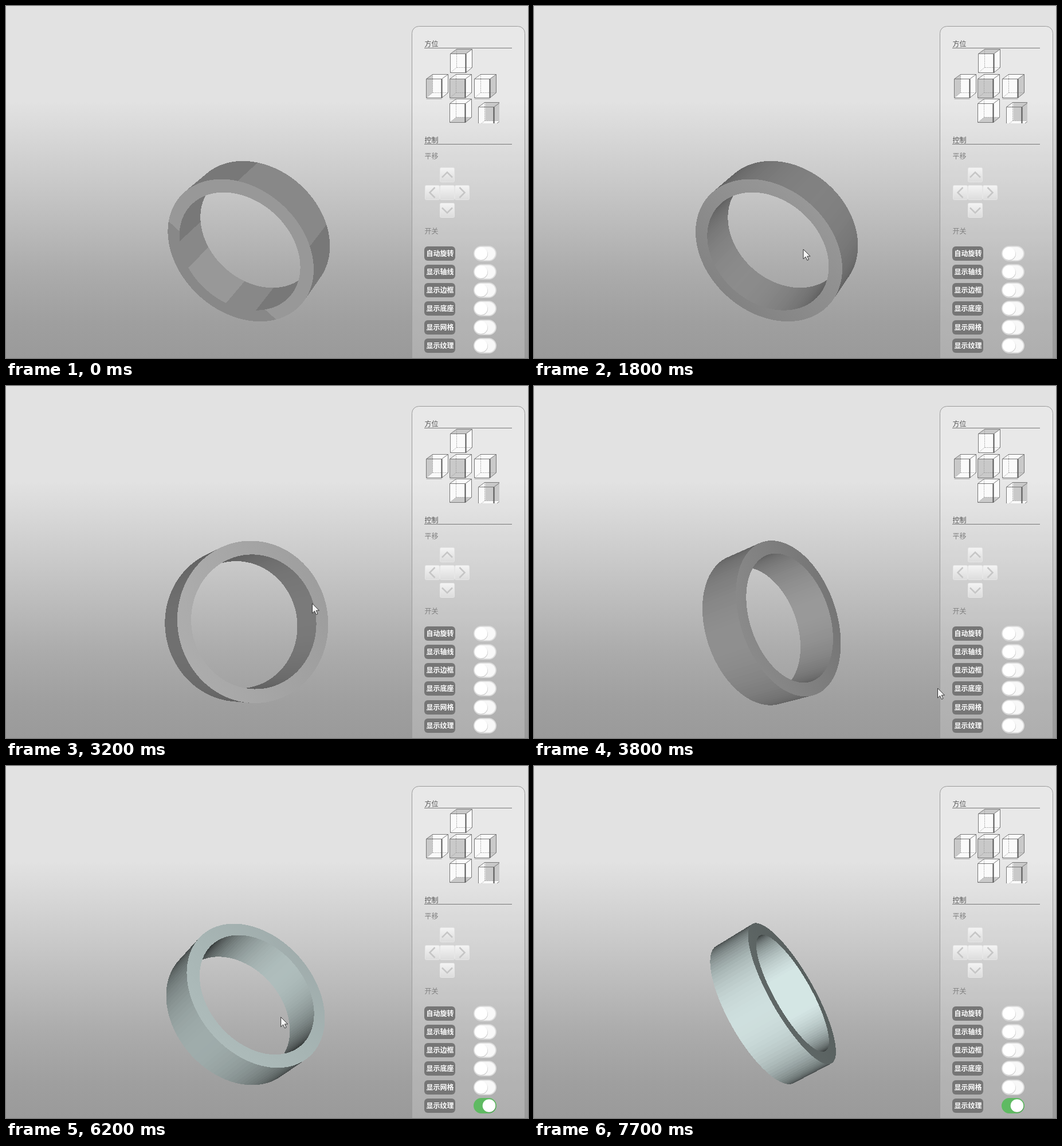
An HTML page for the animation above (8000 ms loop, 911x615 px).

```html
<!DOCTYPE html>
<html lang="zh-CN">
<head>
<meta charset="utf-8">
<title>Ring viewer</title>
<style>
  html, body { margin: 0; width: 100%; height: 100%; overflow: hidden; background: #e2e2e2; }
  svg { display: block; width: 911px; height: 615px; }
  text { font: 12px "Noto Sans CJK SC", "Noto Sans CJK", "Noto Sans", sans-serif; }
  .label { font-weight: 700; }
</style>
</head>
<body>
<svg id="stage" viewBox="0 0 911 615" xmlns="http://www.w3.org/2000/svg">
  <defs>
    <linearGradient id="sky" x1="0" y1="0" x2="0" y2="1">
      <stop offset="0" stop-color="#e2e2e2"/>
      <stop offset=".27" stop-color="#e2e2e2"/>
      <stop offset=".5" stop-color="#c9c9c9"/>
      <stop offset=".76" stop-color="#ababab"/>
      <stop offset=".9" stop-color="#9f9f9f"/>
      <stop offset="1" stop-color="#9a9a9a"/>
    </linearGradient>
    <linearGradient id="key" x1="0" y1="0" x2="0" y2="1">
      <stop offset="0" stop-color="#f4f4f4"/>
      <stop offset="1" stop-color="#dcdcdc"/>
    </linearGradient>
    <linearGradient id="faceShade" gradientUnits="userSpaceOnUse">
      <stop offset="0"/><stop/><stop/><stop offset="1"/>
    </linearGradient>
    <clipPath id="crop"><rect x="822" y="166" width="39" height="39"/></clipPath>
  </defs>
  <rect width="911" height="615" fill="url(#sky)"/>
  <g id="ring" shape-rendering="crispEdges"></g>
  <rect x="708.5" y="35.5" width="197" height="640" rx="12" fill="#fff" fill-opacity=".2" stroke="#9a9a9a"/>
  <g id="panel"></g>
  <path id="arrow" d="M0 0V17L4 13.2 6.8 19.3 9.5 18.1 6.8 12.2H12Z" fill="#f4f4f4" stroke="#333" stroke-linejoin="round"/>
  <path id="hand" d="M-1.5 1C-1.5-1 1.5-1 1.5 1V7C2 6 4.4 6.2 4.5 8 5.2 7 7.2 7.4 7.3 9 8.2 8.2 9.8 8.8 9.8 10.4V14C9.8 16 8.3 17 8.2 20H-.6C-1 17-4 15-6 11-6 9.6-5 8.4-3 9.6L-1.5 11.5Z" fill="#fff" stroke="#222" stroke-linejoin="round"/>
</svg>
<script>
const NS = "http://www.w3.org/2000/svg";
const byId = id => document.getElementById(id);

function add(parent, tag, attrs, label) {
  const el = document.createElementNS(NS, tag);
  set(el, attrs);
  if (label) el.textContent = label;
  parent.appendChild(el);
  return el;
}
function set(el, attrs) {
  for (const k in attrs) el.setAttribute(k, attrs[k]);
}

// ---- side panel ----
const panel = byId("panel");

function heading(label, y, color, ruled) {
  add(panel, "text", { x: 730.5, y, fill: color }, label);
  if (ruled) add(panel, "path", { d: `M730 ${y + 2.5}H883`, stroke: "#777" });
}
heading("方位", 71, "#555", true);
heading("控制", 239, "#555", true);
heading("平移", 267, "#808080");
heading("开关", 398, "#808080");

// Wire cube with one side tinted; (x, y) is the top left of its box.
const SIDES = {
  top: "M0 8L11 0H38L27 8Z",
  left: "M0 8L11 0V32L0 41Z",
  front: "M0 8H27V41H0Z",
  right: "M27 8L38 0V32L27 41Z",
  bottom: "M0 41L11 32H38L27 41Z",
  back: "M12 0H38V32H12Z"
};
function cube(x, y, side, underline, clip) {
  const outer = clip ? add(panel, "g", { "clip-path": "url(#crop)" }) : panel;
  const g = add(outer, "g", { transform: `translate(${x + .5} ${y + .5})`, fill: "none", stroke: "#777" });
  add(g, "path", { d: "M0 8L11 0H38V32L27 41H0Z", fill: "#fafafa", stroke: "none" });
  add(g, "path", { d: SIDES[side], fill: "#c9c9c9", stroke: "none" });
  add(g, "path", { d: "M11 0V32H38M11 32L0 41", stroke: "#999", "stroke-dasharray": "1.5 1.5" });
  add(g, "path", { d: "M0 8L11 0H38V32L27 41H0ZM0 8H27L38 0" });
  add(g, "path", { d: "M27 8V41", stroke: "#555", "stroke-width": 2 });
  if (underline) add(g, "path", { d: "M0 43H27", stroke: "#aaa" });
}
cube(775, 75, "top");
cube(733, 119, "left", true);
cube(774, 119, "front", true);
cube(817, 119, "right", true);
cube(774, 162, "bottom");
cube(824, 168, "back", false, true);

function key(x, y, arrow) {
  add(panel, "rect", { x: x + .5, y: y + .5, width: 25, height: 25, rx: 2, fill: "url(#key)", stroke: "#e6e6e6" });
  if (arrow !== undefined) add(panel, "path", {
    d: "M-9 4.5L0-4.5 9 4.5", fill: "none", stroke: "#c6c6c6", "stroke-width": 2.5,
    transform: `translate(${x + 13} ${y + 13}) rotate(${arrow})`
  });
}
key(757, 282, 0);
key(731, 313, -90);
key(757, 313);
key(783, 313, 90);
key(757, 344, 180);

let pill, knob;
["自动旋转", "显示轴线", "显示边框", "显示底座", "显示网格", "显示纹理"].forEach((label, i) => {
  const y = 432.5 + Math.round(i * 32.15);
  add(panel, "rect", { x: 730, y: y - 12.5, width: 54, height: 25, rx: 6, fill: "#767676" });
  add(panel, "text", { x: 757.5, y: y + 4.5, fill: "#fff", "text-anchor": "middle", class: "label" }, label);
  pill = add(panel, "rect", { x: 817, y: y - 12.5, width: 38, height: 25, rx: 12.5, fill: "#f8f8f8", stroke: "#dcdcdc", "stroke-width": 2 });
  knob = add(panel, "g", {});
  add(knob, "circle", { cx: 829.5, cy: y + .8, r: 11.3, fill: "#000", "fill-opacity": .22 });
  add(knob, "circle", { cx: 829, cy: y, r: 11.3, fill: "#fff" });
});

// ---- ring ----
const CX = 421.5, CY = 414, EYE = 1270;
const R_OUT = 138, R_IN = 114.5, HALF = 38.5, SEG = 120;
const ring = byId("ring");
const strip = () => Array.from({ length: SEG }, () => add(ring, "path", {}));
const inner = strip(), outer = strip();
const face = add(ring, "path", { fill: "url(#faceShade)", "fill-rule": "evenodd" });
const shade = byId("faceShade");

const dot = (a, b) => a[0] * b[0] + a[1] * b[1] + a[2] * b[2];
const cross = (a, b) => [a[1] * b[2] - a[2] * b[1], a[2] * b[0] - a[0] * b[2], a[0] * b[1] - a[1] * b[0]];
const unit = a => a.map(v => v / Math.hypot(...a));
const mix = (a, b, k) => a.map((v, i) => v + (b[i] - v) * k);

function project([x, y, z]) {
  const s = EYE / (EYE - z);
  return (CX + x * s).toFixed(2) + " " + (CY + y * s).toFixed(2);
}
const facesEye = (normal, p) => dot(normal, [-p[0], -p[1], EYE - p[2]]) > 0;
const poly = pts => "M" + pts.map(project).join("L") + "Z";

const CUTS = [123, 136.5];
const posterize = g => g < CUTS[0] ? 120 : g < CUTS[1] ? 136 : 152;

function light(nz, textured) {
  nz = Math.max(0, nz);
  return textured ? 44 + 188 * nz : 88 + 66 * nz + 36 * nz ** 10;
}
function tint(g, textured) {
  g = Math.min(g, 230);
  return textured ? `rgb(${g * .925 | 0},${g | 0},${g * .995 | 0})` : `rgb(${g | 0},${g | 0},${g | 0})`;
}

function drawRing(axis, textured, coarse) {
  const u = unit(cross(axis, [0, 1, 0])), v = cross(axis, u);
  const radial = i => {
    const a = i / SEG * 2 * Math.PI, c = Math.cos(a), s = Math.sin(a);
    return u.map((_, k) => u[k] * c + v[k] * s);
  };
  const at = (dir, r, h) => dir.map((d, k) => d * r + axis[k] * h);
  const color = g => tint(coarse ? posterize(g) : g, textured);
  const innerGlow = textured ? 17 : 10;

  function wall(parts, r, sign) {
    parts.forEach((el, i) => {
      const a = radial(i), m = radial(i + .5), b = radial(i + 1);
      const normal = m.map(d => d * sign);
      const shown = facesEye(normal, at(m, r, 0));
      el.style.display = shown ? "" : "none";
      if (!shown) return;
      const g = light(normal[2], textured) + (sign < 0 ? innerGlow : 0);
      set(el, { d: poly([at(a, r, -HALF), at(b, r, -HALF), at(b, r, HALF), at(a, r, HALF)]), fill: color(g) });
    });
  }
  wall(inner, R_IN, -1);
  wall(outer, R_OUT, 1);

  const side = axis[2] < 0 ? -1 : 1;
  const n = axis.map(d => d * side), mid = n.map(d => d * HALF);
  const shown = facesEye(n, mid);
  face.style.display = shown ? "" : "none";
  if (!shown) return;
  const rim = r => poly(Array.from({ length: SEG }, (_, i) => at(radial(i), r, HALF * side)));
  face.setAttribute("d", rim(R_OUT) + rim(R_IN));

  // The face brightens away from the direction it leans to.
  const flat = Math.hypot(n[0], n[1]) || 1e-6;
  const dx = -n[0] / flat * R_OUT, dy = -n[1] / flat * R_OUT;
  const x = CX + mid[0], y = CY + mid[1];
  set(shade, { x1: x - dx, y1: y - dy, x2: x + dx, y2: y + dy });
  const g = light(n[2], textured) - 1;
  const swing = R_OUT * flat * (textured ? .1 : .155);
  const lo = g - swing, hi = g + swing;
  const cut = coarse ? (CUTS[1] - lo) / (2 * swing) : .5;
  const colors = coarse ? [lo, lo, hi, hi] : [lo, g, g, hi];
  [...shade.children].forEach((stop, i) => set(stop, {
    offset: [0, cut, cut, 1][i], "stop-color": color(colors[i])
  }));
}

// ---- motion: [time, ...values] ----
const AXIS = [
  [0, -.43, .47, .77], [500, -.43, .47, .77], [1100, -.735, .677, -.03],
  [1800, -.42, .47, .775], [2500, -.195, .379, .9], [2700, -.195, .379, .9],
  [3300, .4, -.1, .91], [3800, .75, -.26, .61], [4500, .76, -.26, .595],
  [6000, .76, -.26, .595], [6300, .42, -.5, .757], [6800, .458, -.585, .67],
  [7200, .83, -.47, .3]
];
const POINTER = [
  [100, 706, 604], [500, 500, 410], [1100, 426.5, 477], [1800, 470, 425],
  [2500, 450.5, 404.5], [2700, 452, 402], [3100, 530, 350], [3400, 548, 470],
  [3600, 550, 548], [3800, 704.5, 528], [4500, 830, 588], [4800, 832, 594],
  [4900, 833, 596], [5500, 833, 596], [6100, 480, 440], [6800, 473, 413.5],
  [7200, 535, 390], [7600, 806, 600]
];

function track(keys, t) {
  const i = keys.findIndex(k => k[0] > t);
  if (i === 0) return keys[0].slice(1);
  if (i < 0) return keys[keys.length - 1].slice(1);
  const a = keys[i - 1], b = keys[i], k = (t - a[0]) / (b[0] - a[0]);
  return mix(a.slice(1), b.slice(1), (1 - Math.cos(Math.PI * k)) / 2);
}

const HOLDS = [[4500, 4800], [4900, 5200], [5200, 5500], [7700, 8000]];
function step(ms) {
  const t = Math.floor(ms / 100) * 100;
  const hold = HOLDS.find(h => t >= h[0] && t < h[1]);
  return hold ? hold[0] : t;
}

function draw(t) {
  const textured = t >= 5200;
  drawRing(unit(track(AXIS, t)), textured, t < 100);

  const green = t < 5500 ? "#84c586" : "#5fba62";
  set(pill, { fill: textured ? green : "#f8f8f8", stroke: textured ? green : "#dcdcdc" });
  knob.setAttribute("transform", `translate(${textured ? 14 : 0} 0)`);

  const onSwitch = t >= 4900 && t < 5600;
  const [x, y] = track(POINTER, t);
  const place = `translate(${x} ${y})`;
  set(byId("arrow"), { transform: place, visibility: onSwitch || t < 100 || t >= 7700 ? "hidden" : "visible" });
  set(byId("hand"), { transform: place, visibility: onSwitch ? "visible" : "hidden" });
}

let last = -1;
const start = performance.now();
function tick() {
  const t = step((performance.now() - start) % 8000);
  if (t !== last) draw(last = t);
  requestAnimationFrame(tick);
}
tick();
</script>
</body>
</html>
```
